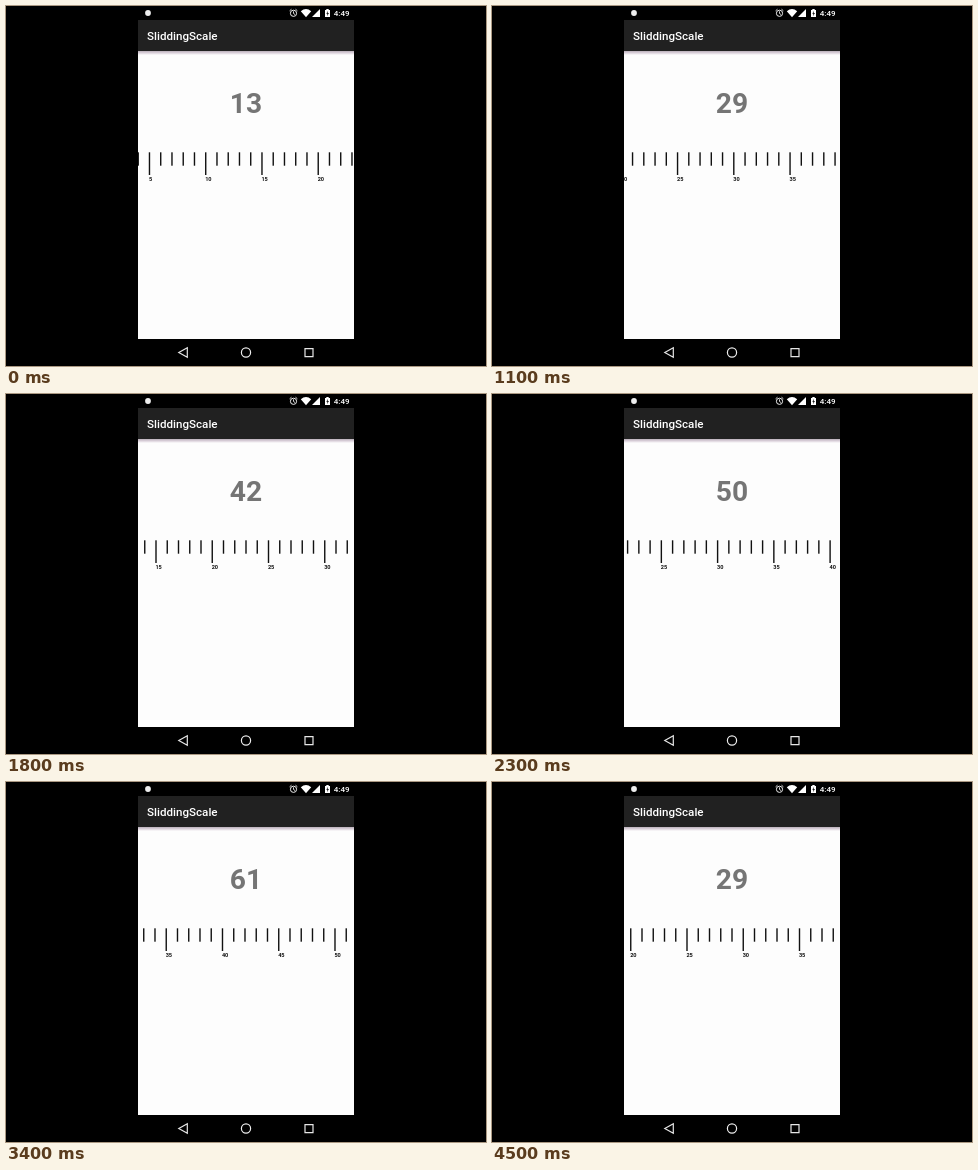
An HTML page with a canvas that plays this animation: 480x360 px, repeating every 4.6 s.

```html
<!DOCTYPE html>
<html lang="en">
<head>
<meta charset="utf-8">
<title>Sliding scale</title>
<style>
html, body { margin: 0; width: 100%; height: 100%; overflow: hidden; background: #000; }
canvas { display: block; }
</style>
</head>
<body>
<canvas id="stage" width="480" height="360"></canvas>
<script>
const ctx = document.getElementById('stage').getContext('2d');
const LOOP = 4600, STEP = 100;
const LEFT = 132, WIDTH = 216, CENTER = 240, UNIT = 11.25;

// The ruler labels fall back by one screen once the value passes this point.
const REBASE_AT = 36, REBASE_BY = 19;

// [time, value, ease-out power of the segment that ends here]
const KEYS = [
  [0, 13.58], [700, 22.47], [1100, 29.84], [1800, 42], [2300, 50.28],
  [2400, 51.5], [2600, 51.5], [3150, 62.5, 1.5], [3400, 61.09], [4500, 29, 2.4]
];

function valueAt(time) {
  const i = KEYS.findIndex(key => key[0] >= time);
  if (i === 0) return KEYS[0][1];
  const [t0, v0] = KEYS[i - 1], [t1, v1, power = 1] = KEYS[i];
  const left = (t1 - time) / (t1 - t0);
  return v1 + (v0 - v1) * left ** power;
}

function rect(color, x, y, w, h) {
  ctx.fillStyle = color;
  ctx.fillRect(x, y, w, h);
}

function text(string, x, y, size, weight, color, align = 'left') {
  ctx.font = `${weight} ${size}px Roboto, sans-serif`;
  ctx.fillStyle = color;
  ctx.textAlign = align;
  ctx.fillText(string, x, y);
}

function shape(path, color, lineWidth) {
  const outline = new Path2D(path);
  ctx.fillStyle = ctx.strokeStyle = color;
  if (lineWidth) {
    ctx.lineWidth = lineWidth;
    ctx.stroke(outline);
  } else {
    ctx.fill(outline);
  }
}

function circle(x, y, r, lineWidth) {
  shape(`M${x - r} ${y}a${r} ${r} 0 1 1 ${2 * r} 0a${r} ${r} 0 1 1 ${-2 * r} 0Z`, '#eee', lineWidth);
}

function drawStatusBar() {
  circle(142, 7, 2.9);
  circle(287.5, 7.3, 3.1, 1);
  shape('M287.5 5.3V7.5L289 8.5M283.6 4.8L285.5 3.2M291.4 4.8L289.5 3.2', '#eee', 0.9);
  shape('M294.8 5.2Q300 1 305.2 5.2L300 11.2Z', '#fff');
  shape('M306 11L314 3V11Z', '#fff');
  shape('M319 4H320.3V3H322.7V4H324V11H319Z', '#fff');
  shape('M322 4.8L320.3 7.7H321.5L321 10.2L322.9 7H321.6Z', '#000');
  text('4:49', 343.5, 10.2, 8, 500, '#fff', 'right');
}

function drawApp() {
  rect('#000', 0, 0, 480, 360);
  rect('#fdfdfd', LEFT, 45, WIDTH, 288);
  rect('#212121', LEFT, 14, WIDTH, 31);
  const shadow = ctx.createLinearGradient(0, 45, 0, 49);
  shadow.addColorStop(0, '#b9afb9');
  shadow.addColorStop(0.5, '#ddd3dd');
  shadow.addColorStop(1, '#fdfdfd');
  rect(shadow, LEFT, 45, WIDTH, 4);
  text('SliddingScale', 141, 34, 11.6, 500, '#fff');
}

function drawNavBar() {
  shape('M181.3 341.8V351.2L172.8 346.5Z', '#e6e6e6', 1.2);
  circle(240, 346.5, 4.6, 1.2);
  shape('M299 342.6H307V350.6H299Z', '#e6e6e6', 1.2);
}

function drawRuler(position) {
  ctx.save();
  ctx.beginPath();
  ctx.rect(LEFT, 140, WIDTH, 40);
  ctx.clip();
  const first = Math.floor(position) - 12;
  for (let mark = first; mark < first + 25; mark++) {
    const x = CENTER + (mark - position) * UNIT;
    const major = mark % 5 === 0;
    rect('#111', x - 0.7, 146.3, 1.4, major ? 22.7 : 13.4);
    if (major) text(mark, x - 0.6, 175.2, 5.6, 700, '#111');
  }
  ctx.restore();
}

function draw(now) {
  const time = Math.floor(now % LOOP / STEP) * STEP;
  const value = valueAt(time);
  drawApp();
  drawStatusBar();
  drawNavBar();
  text(Math.floor(value + 0.001), CENTER, 107, 28.2, 700, '#757575', 'center');
  drawRuler(value > REBASE_AT ? value - REBASE_BY : value);
  requestAnimationFrame(draw);
}

draw(0);
</script>
</body>
</html>
```
